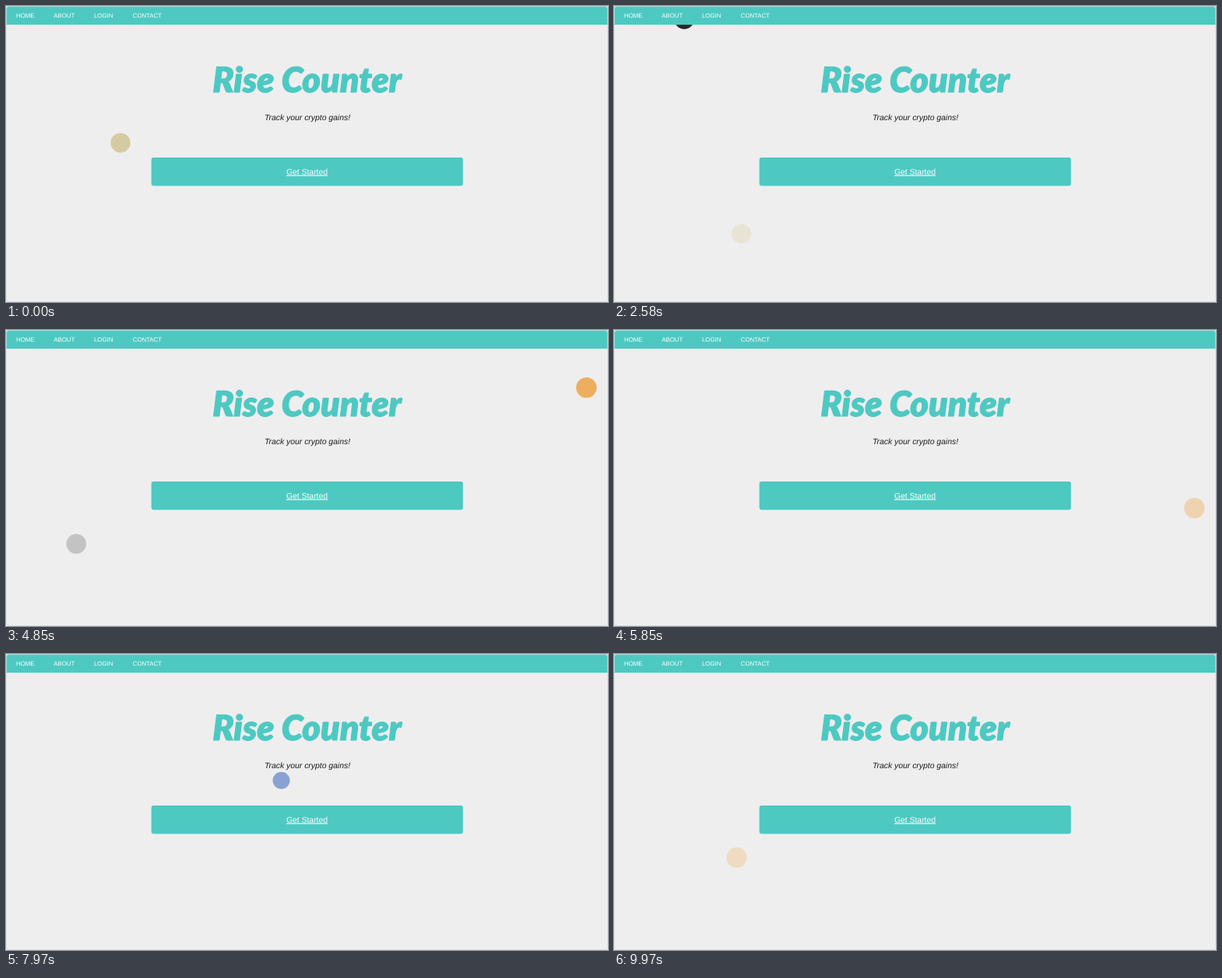
An HTML page for the animation above (10 s loop, 773x381 px).

```html
<!DOCTYPE html>
<html lang="en">
<head>
<meta charset="utf-8">
<title>Rise Counter</title>
<style>
  html, body { margin: 0; width: 100%; height: 100%; overflow: hidden; background: #e6eef0; }
  svg { display: block; width: 773px; height: 381px; }
  text { font-family: "Liberation Sans", Arial, sans-serif; text-rendering: geometricPrecision; }
  .nav text { font-size: 7.9px; letter-spacing: -.05px; fill: #fff; }
  .mid { text-anchor: middle; font-size: 10.4px; }
  .title {
    font: italic 900 44.8px Lato, sans-serif;
    text-anchor: middle;
    fill: #4dc9c2;
    stroke: #4dc9c2;
    stroke-width: 1.1;
    stroke-linejoin: round;
  }
</style>
</head>
<body>
<svg viewBox="0 0 773 381">
  <defs>
    <clipPath id="page"><rect width="773" height="381" rx="4"/></clipPath>
  </defs>
  <g clip-path="url(#page)">
    <rect width="773" height="381" fill="#efeeef"/>
    <text class="title" x="386.5" y="110.8">Rise Counter</text>
    <text class="mid" x="387" y="146.8" font-style="italic" fill="#1c1c1c">Track your crypto gains!</text>
    <rect x="186.6" y="195.1" width="400.2" height="36.3" rx="3" fill="#4dc9c2"/>
    <text class="mid" x="386.5" y="216.8" fill="#fff" text-decoration="underline">Get Started</text>
    <g id="coins"></g>
    <rect width="773" height="24.1" fill="#4dc9c2"/>
    <g class="nav">
      <text x="13" y="15">HOME</text>
      <text x="61.3" y="15">ABOUT</text>
      <text x="113" y="15">LOGIN</text>
      <text x="162.8" y="15">CONTACT</text>
    </g>
  </g>
  <rect x=".5" y=".5" width="772" height="380" rx="4" fill="none" stroke="#cfe0e6" stroke-opacity=".8"/>
</svg>
<script>
  const LOOP = 10000, TOP = -13, BOTTOM = 345;
  const gold = '#b8a347', black = '#141414', orange = '#ec9a30', blue = '#2a5ab8';

  // start in ms, speed in px per second
  const coins = [
    { x: 147, r: 12.7, color: gold, start: -1718, speed: 110 },
    { x: 163.5, r: 12.7, color: gold, start: 255, speed: 131.6 },
    { x: 90.2, r: 12.7, color: black, start: 2316, speed: 113.7 },
    { x: 745.3, r: 13.2, color: orange, start: 4289, speed: 155 },
    { x: 353.5, r: 11, color: blue, start: 6283, speed: 104.1 },
    { x: 157.5, r: 13.2, color: orange, start: 8197, speed: 155 }
  ];

  const layer = document.getElementById('coins');
  for (const coin of coins) {
    coin.el = document.createElementNS(layer.namespaceURI, 'circle');
    coin.el.setAttribute('cx', coin.x);
    coin.el.setAttribute('r', coin.r);
    coin.el.setAttribute('fill', coin.color);
    layer.append(coin.el);
  }

  function draw(now) {
    const t = now % LOOP;
    for (const { el, start, speed } of coins) {
      const y = TOP + (t - start) / 1000 * speed;
      const shown = y >= TOP && y < BOTTOM;
      el.setAttribute('cy', y.toFixed(2));
      el.setAttribute('opacity', shown ? ((BOTTOM - y) / (BOTTOM - TOP)).toFixed(3) : 0);
    }
  }

  const begin = performance.now();
  function tick() {
    draw(performance.now() - begin);
    requestAnimationFrame(tick);
  }
  draw(0);
  requestAnimationFrame(tick);
</script>
</body>
</html>
```
